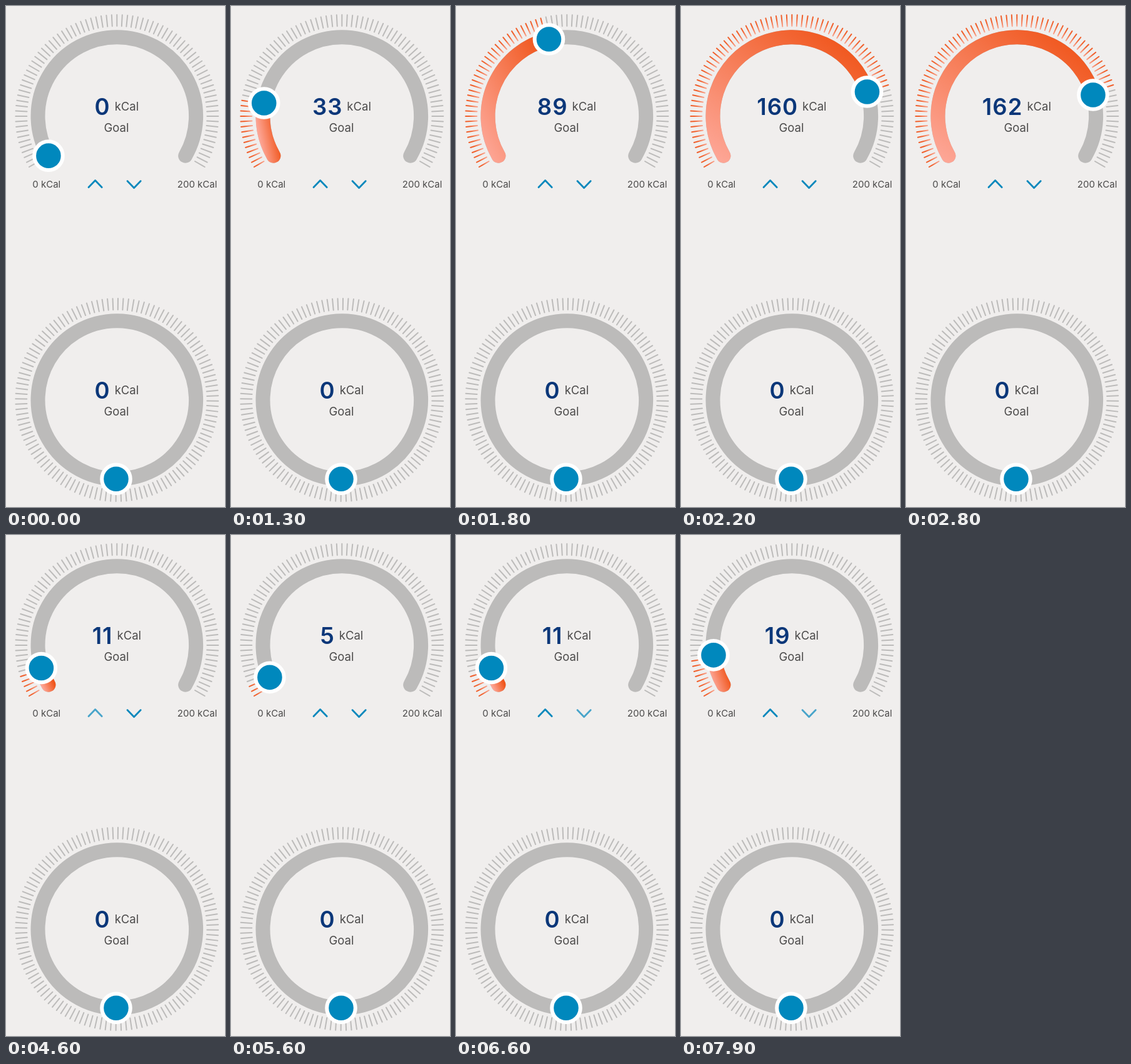
An HTML page that plays this animation: 350x800 px, repeating every 8000 ms.

```html
<!DOCTYPE html>
<html lang="en">
<head>
<meta charset="utf-8">
<title>Goal dials</title>
<style>
  html, body { margin: 0; width: 100%; height: 100%; overflow: hidden; background: #f0eeed; }
  svg { display: block; width: 350px; height: 800px; font-family: Inter, sans-serif; }
  .track { fill: none; stroke: #bcbbba; stroke-width: 23; stroke-linecap: round; }
  .fill { stroke: url(#arc); }
  .tick { stroke: #bcbbba; stroke-width: 2; stroke-linecap: round; }
  .tick.on { stroke: url(#glow); }
  .knob { fill: #0088bd; stroke: #fff; stroke-width: 6; }
  .value { font-size: 18.5px; fill: #4b4a4a; text-anchor: middle; }
  .num { font-size: 36.5px; font-weight: 600; letter-spacing: 1px; fill: #0b3779; }
  .label { font-size: 15px; fill: #4b4a4a; }
  .arrow { fill: none; stroke: #0788bc; stroke-width: 2.8; stroke-linecap: round; stroke-linejoin: round; }
</style>
</head>
<body>
<svg viewBox="0 0 350 800">
  <defs>
    <linearGradient id="arc" x1="0" y1="1" x2="1" y2="0">
      <stop offset="0" stop-color="#fda696"/>
      <stop offset=".92" stop-color="#f0561c"/>
    </linearGradient>
    <radialGradient id="glow" gradientUnits="userSpaceOnUse" cx="0" cy="0" r="163">
      <stop offset=".87" stop-color="#fbb09f"/>
      <stop offset=".96" stop-color="#f0602c"/>
    </radialGradient>
  </defs>
  <text class="label" x="42.3" y="290">0 kCal</text>
  <text class="label" x="273.8" y="290">200 kCal</text>
  <path class="arrow" id="up" d="M132 289.5 142.6 278.5 153.2 289.5"/>
  <path class="arrow" id="down" d="M194 279.5 204.6 290.5 215.2 279.5"/>
</svg>
<script>
const svg = document.querySelector('svg');
const up = document.getElementById('up'), down = document.getElementById('down');
const R = 126.3, MAX = 200, LOOP = 8000, STEP = 100;

// [time, value]: drag up and back, then one button down and the other up
const keys = [
  [1000, 0], [1800, 89], [1900, 108], [2200, 160], [2450, 183], [2600, 180],
  [2800, 162], [3400, 88], [3700, 45], [4000, 23], [4300, 12], [4500, 12],
  [4600, 11], [5500, 5], [5700, 5], [6600, 11], [7900, 19]
];

function add(parent, tag, attrs, text) {
  const el = document.createElementNS('http://www.w3.org/2000/svg', tag);
  for (const k in attrs) el.setAttribute(k, attrs[k]);
  if (text) el.textContent = text;
  parent.append(el);
  return el;
}

function polar(r, deg) {
  const a = deg * Math.PI / 180;
  return [r * Math.cos(a), r * Math.sin(a)];
}

function arcPath(from, to) {
  return `M${polar(R, from)}A${R} ${R} 0 ${to - from > 180 ? 1 : 0} 1 ${polar(R, to)}`;
}

function makeDial(cy, start, sweep, tickCount) {
  const g = add(svg, 'g', { transform: `translate(177.3 ${cy})` });
  const ticks = [];
  for (let i = 0; i < tickCount; i++) {
    const deg = start + i * 3;
    const [x1, y1] = polar(144, deg), [x2, y2] = polar(162, deg);
    ticks.push({ deg, el: add(g, 'line', { class: 'tick', x1, y1, x2, y2 }) });
  }
  add(g, 'path', { class: 'track', d: arcPath(start, start + sweep) });
  const fill = add(g, 'path', { class: 'track fill' });
  const knob = add(g, 'circle', { class: 'knob', r: 22.8 });
  const value = add(g, 'text', { class: 'value', x: -0.4, y: -9 });
  const num = add(value, 'tspan', { class: 'num', dy: 7 });
  add(value, 'tspan', { dx: 7, dy: -7 }, 'kCal');
  add(g, 'text', { class: 'value', x: -0.8, y: 25 }, 'Goal');

  return v => {
    const deg = start + sweep * v / MAX;
    const [x, y] = polar(R, deg);
    knob.setAttribute('cx', x);
    knob.setAttribute('cy', y);
    num.textContent = v;
    fill.setAttribute('d', v ? arcPath(start, deg) : '');
    for (const t of ticks) t.el.classList.toggle('on', v > 0 && t.deg <= deg);
  };
}

function valueAt(t) {
  let [t0, v0] = [0, 0];
  for (const [t1, v1] of keys) {
    if (t <= t1) return Math.round(v0 + (v1 - v0) * (t - t0) / (t1 - t0));
    [t0, v0] = [t1, v1];
  }
  return v0;
}

const setTop = makeDial(176, 150, 240, 81);
const setBottom = makeDial(629, 90.6, 359.4, 120);
setBottom(0);

function draw(now) {
  const t = Math.floor(now % LOOP / STEP) * STEP;
  setTop(valueAt(t));
  up.style.opacity = t >= 4600 && t < 5600 ? .72 : 1;
  down.style.opacity = t >= 5700 ? .72 : 1;
}

function frame() {
  draw(performance.now());
  requestAnimationFrame(frame);
}
frame();
</script>
</body>
</html>
```
